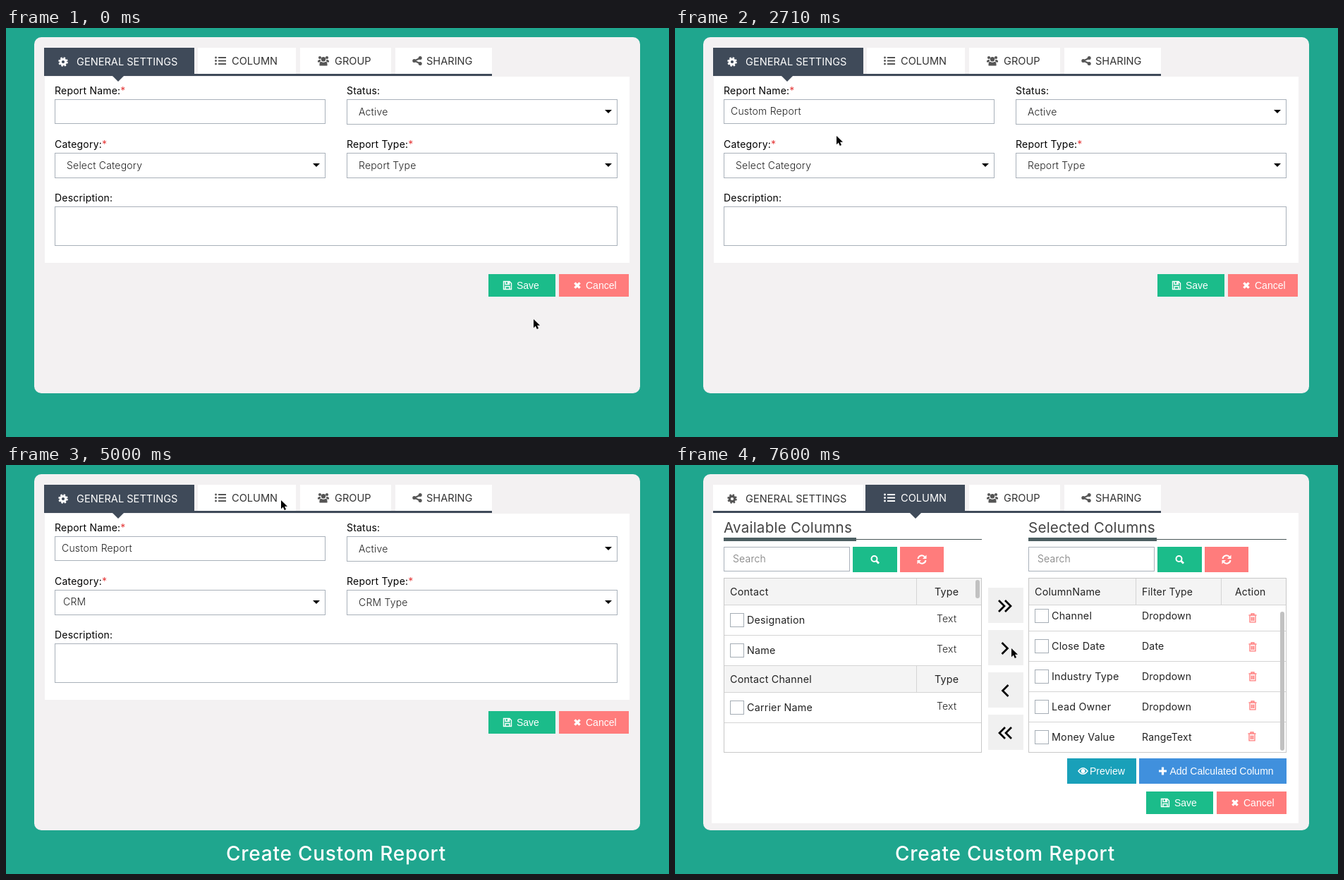
An HTML page that plays this animation: 940 by 580 pixels, repeating every 8000 ms.

```html
<!DOCTYPE html>
<html lang="en">
<head>
<meta charset="utf-8">
<title>Report builder</title>
<style>
  html, body { margin: 0; width: 100%; height: 100%; overflow: hidden; background: #1fa68e; }
  svg { display: block; font: 14px Inter, sans-serif; letter-spacing: .015em; fill: #222; }
  text { white-space: pre; }
  .tab { font-size: 14.6px; letter-spacing: 0; }
  .label { fill: #000; }
  .value { font-weight: 300; }
  .hint { fill: #777; }
  .list { font-size: 14.3px; }
  .head { font-size: 20.6px; fill: #444; }
  .button { font: 14px "Liberation Sans", Arial, sans-serif; letter-spacing: 0; fill: #fff; }
  .caption { font-size: 28px; font-weight: 500; letter-spacing: .027em; fill: #fff; }
  .line { fill: none; stroke: currentColor; stroke-width: 2; }
  .icon { fill: currentColor; }
</style>
</head>
<body>
<svg id="stage" width="940" height="580" viewBox="0 0 940 580"></svg>
<script>
const DARK = '#3f4a59', GREEN = '#1bbc8a', RED = '#ff7c7c', GREY = '#f4f4f4', EDGE = '#a9b1ba', RULE = '#d4d4d4';

const rect = (x, y, w, h, fill, extra = '') =>
  `<rect x="${x}" y="${y}" width="${w}" height="${h}" fill="${fill}" ${extra}/>`;
const frame = (x, y, w, h, color = EDGE, fill = '#fff') =>
  rect(x + .5, y + .5, w - 1, h - 1, fill, `stroke="${color}"`);
const text = (x, y, s, cls, extra = '') => `<text x="${x}" y="${y}" class="${cls}" ${extra}>${s}</text>`;
const group = (id, content, extra = '') => `<g id="${id}" ${extra}>${content}</g>`;
const line = d => `<path class="line" d="${d}"/>`;
const solid = d => `<path class="icon" d="${d}"/>`;
const dot = (x, y, r) => `<circle class="icon" cx="${x}" cy="${y}" r="${r}"/>`;

// Icons are centred on 0,0
const ICONS = {
  gear: `<circle class="line" r="3.7" style="stroke-width:3.2"/>
    <circle class="line" r="5.6" style="stroke-width:2.4" stroke-dasharray="2.4 2"/>`,
  list: [-4.5, 0, 4.5].map(y => dot(-6.5, y, 1.4) + line(`M-3 ${y}H8`)).join(''),
  users: dot(-5, -4.5, 2.1) + dot(5, -4.5, 2.1) + dot(0, -2.2, 3.2) +
    solid('M-8 2V0Q-7-2-4-1.5L-4.5 2ZM8 2V0Q7-2 4-1.5L4.5 2ZM-5.5 7Q-6 1.5-3 1.3Q0 3 3 1.3Q6 1.5 5.5 7Z'),
  share: line('M4.5-4L-4 0L4.5 4') + dot(4.2, -4, 2.5) + dot(-4.2, 0, 2.5) + dot(4.2, 4, 2.5),
  save: `<g style="stroke-width:1.4">` + '<path d="M-5.5-5.5H3L5.5-3V5.5H-5.5ZM-3-5.5V-1.5H2.5V-5.5M-3 5.5V1.5H3V5.5" fill="none" stroke="currentColor"/></g>' +
    solid('M0-5H2V-2H0Z'),
  cross: '<path d="M-3.6-3.6L3.6 3.6M3.6-3.6L-3.6 3.6" stroke="currentColor" stroke-width="3.4"/>',
  search: '<circle class="line" cx="-1" cy="-1" r="4"/>' + '<path d="M2 2L5.5 5.5" stroke="currentColor" stroke-width="2.8"/>',
  refresh: line('M-5.5-1A5.4 5.4 0 0 1 4.2-3.5M5.5 1A5.4 5.4 0 0 1-4.2 3.5') + solid('M6.5-6.5V-1H1ZM-6.5 6.5V1H-1Z'),
  trash: '<path d="M-5.5-4H5.5M-2-4.5V-6H2V-4.5M-4-3V5.8H4V-3M-1.7-1.5V4M0-1.5V4M1.7-1.5V4" fill="none" stroke="currentColor" stroke-width="1.3"/>',
  eye: '<path d="M-6.5 0Q0-8.5 6.5 0Q0 8.5-6.5 0Z" fill="none" stroke="currentColor" stroke-width="1.5"/>' + dot(0, 0, 2.9),
  plus: '<path d="M-5.5 0H5.5M0-5.5V5.5" stroke="currentColor" stroke-width="3.2"/>',
  down: solid('M-5-2.5H5L0 2.5Z'),
  right: '<path d="M-4-8L4 0L-4 8" fill="none" stroke="currentColor" stroke-width="2.7"/>',
};
const icon = (name, x, y, color = '#fff', scale = '') =>
  `<g transform="translate(${x} ${y}) ${scale}" color="${color}">${ICONS[name]}</g>`;

const button = (x, y, w, h, fill, name, iconX, label = '', textX = 0) =>
  rect(x, y, w, h, fill) + icon(name, iconX, y + h / 2) +
  (label && text(textX, y + h / 2 + 5, label, 'button'));
const saveCancel = (x, y) =>
  button(x, y, 95, 32, GREEN, 'save', x + 27, 'Save', x + 40) +
  button(x + 100, y, 99, 32, RED, 'cross', x + 126, 'Cancel', x + 138);

// Tabs: left, width, icon, icon x, text x, label
const TABS = [
  [54, 213, 'gear', 81, 100, 'GENERAL SETTINGS'],
  [272, 139, 'list', 304, 320, 'COLUMN'],
  [417, 129, 'users', 450, 466, 'GROUP'],
  [552, 137, 'share', 583, 596, 'SHARING'],
];
const tabs = active => rect(54, 65, 635, 3, DARK) + TABS.map(([x, w, name, iconX, textX, label], i) => {
  const on = i === active;
  const left = on && i ? x - 2 : x, mid = i ? 341 : 159;
  return rect(left, 28, x + w - left, on ? 40 : 37, on ? DARK : '#fff') +
    (on ? `<path d="M${mid - 8} 68h16l-8 8z" fill="${DARK}"/>` : '') +
    icon(name, iconX, i ? 46.5 : 48, on ? '#fff' : '#555') +
    text(textX, i ? 52 : 53, label, 'tab', `style="fill:${on ? '#fff' : '#333'}"`);
}).join('');

const label = (x, y, s, required) =>
  text(x, y, s + (required ? '<tspan fill="#e53e3e">*</tspan>' : ''), 'label');
const select = (x, y) => frame(x, y, 384, 36) + icon('down', x + 371, y + 17.5, '#000');

const general = rect(55, 69, 829, 264, '#fff') + tabs(0) +
  label(69, 94, 'Report Name:', true) + frame(69, 101, 384, 35) +
  label(483, 94, 'Status:') + select(483, 101) + text(500, 124, 'Active', 'value') +
  label(69, 170, 'Category:', true) + select(69, 177) +
  label(483, 170, 'Report Type:', true) + select(483, 177) +
  label(69, 246, 'Description:') + frame(69, 253, 798, 56) +
  text(79, 123, 'Custom Report', 'value', 'id="name"') +
  text(0, 0, '', 'value', 'id="category"') + text(500, 200, '', 'value', 'id="type"') +
  saveCancel(684, 349);

const checkbox = (x, y) => frame(x, y, 20, 20, '#a5adb5');
const rule = (x, y) => rect(x, y, 366, 1, RULE);
const listHead = (x, title, width) =>
  text(x, 96, title, 'head') + rect(x, 105, 366, 1, '#4a5658') + rect(x, 103, width, 5, '#4d5f62') +
  frame(x, 116, 179, 35) + text(x + 13, 138, 'Search', 'value hint') +
  button(x + 183, 116, 63, 36, GREEN, 'search', x + 214.5) +
  button(x + 250, 116, 62, 36, RED, 'refresh', x + 281);
const section = (y, title) =>
  rect(69, y, 366, 38, GREY) + rect(342, y, 1, 38, RULE) + rule(69, y) + rule(69, y + 38) +
  text(78, y + 25, title, 'list') + text(368, y + 25, 'Type', 'list');
const leftRow = (y, name, type, typeX = 371) =>
  checkbox(78, y - 10) + text(102, y + 5, name, 'list') + text(typeX, y + 3, type, typeX < 371 ? '' : 'value');
const rightRow = (y, name, type, trashY, trashX = 819) =>
  checkbox(510, y - 10) + text(534, y + 5, name, 'list') + text(662, y + 5, type, '') + icon('trash', trashX, trashY, RED);

const mover = (y, flip, xs) => rect(444, y, 50, 50, '#f0f0f0') +
  xs.map(x => icon('right', x, y + 26, '#000', `scale(${flip} 1)`)).join('');

const columns = rect(52, 68, 832, 440, '#fff') + tabs(1) +
  listHead(69, 'Available Columns', 188) + listHead(501, 'Selected Columns', 182) +
  section(160, 'Contact') + leftRow(220, 'Designation', 'Text') + rule(69, 241) + leftRow(263, 'Name', 'Text') +
  section(284, 'Contact Channel') + leftRow(344, 'Carrier Name', 'Text') + rule(69, 365) +
  group('available', leftRow(387, 'Money Value', 'RangeText', 328) +
    group('checked', frame(78, 377, 20, 20, '#2196f3') +
      '<path d="M83 387.5l4 4 7-8" fill="none" stroke="#2196f3" stroke-width="2.6"/>')) +
  frame(69, 160, 366, 248, '#c8c8c8', 'none') + rect(426, 163, 6, 26, '#c1c1c1', 'rx="3"') +
  rect(501, 160, 366, 38, GREY) + rect(653, 160, 1, 38, RULE) + rect(774, 160, 1, 38, RULE) +
  text(510, 185, 'ColumnName', 'list') + text(662, 185, 'Filter Type', '') + text(794, 185, 'Action', '') +
  [198, 235, 278, 321, 364].map(y => rule(501, y)).join('') +
  rightRow(214, 'Channel', 'Dropdown', 217) + rightRow(257, 'Close Date', 'Date', 258) +
  rightRow(300, 'Industry Type', 'Dropdown', 300) + rightRow(343, 'Lead Owner', 'Dropdown', 341) +
  group('selected', rightRow(386, 'Money Value', 'RangeText', 385, 818)) +
  frame(501, 160, 366, 248, '#c8c8c8', 'none') + rect(858, 208, 6, 197, '#c1c1c1', 'rx="3"') +
  mover(174, 1, [463, 472]) + mover(234, 1, [467.5]) + mover(294, -1, [468.5]) + mover(354, -1, [464, 473]) +
  group('pressed', rect(443, 235, 50, 50, '#dedede') + icon('right', 467.5, 260, '#000')) +
  button(556, 416, 98, 36, '#19a0b9', 'eye', 578.5, 'Preview', 588) +
  button(658, 416, 209, 36, '#4090dd', 'plus', 691.5, 'Add Calculated Column', 701.5) +
  saveCancel(668, 463);

const stage = document.getElementById('stage');
stage.innerHTML = '<clipPath id="below"><path d="M0 526H940V580H0Z"/></clipPath>' +
  rect(0, 0, 940, 580, '#1fa68e') + rect(40, 13, 859, 505, '#f3f1f2', 'rx="10"') +
  group('general', general) + group('columns', columns) +
  `<g clip-path="url(#below)">${text(312, 561, 'Create Custom Report', 'caption', 'id="caption"')}</g>` +
  '<path id="cursor" d="M0 0V12.3L2.8 9.6L4.8 14L7 13L5 8.8H9Z" fill="#000"/>';

const el = id => document.getElementById(id);
const show = (id, on) => { el(id).style.display = on ? '' : 'none'; };

// Share of a stepped linear move that is done at time t
const progress = (t, start, interval, steps) =>
  Math.max(0, Math.min(steps, Math.floor((t - start) / interval) + 1)) / steps;

// Cursor moves: start, step interval, steps, target x, target y
const MOVES = [
  [1030, 30, 9, 120, 117],
  [2310, 100, 10, 338, 189],
  [3950, 30, 7, 630, 196],
  [4790, 30, 8, 390, 50],
  [6160, 30, 9, 86, 387],
  [6960, 30, 8, 477, 260],
];

function render(t) {
  let x = 748, y = 413;
  for (const [start, interval, steps, toX, toY] of MOVES) {
    const p = progress(t, start, interval, steps);
    x += (toX - x) * p;
    y += (toY - y) * p;
  }
  el('cursor').setAttribute('transform', `translate(${x} ${y})`);
  el('caption').setAttribute('y', 561 - 170.5 * (1 - progress(t, 2310, 100, 11)));

  const picked = t >= 3820, category = el('category');
  category.textContent = picked ? 'CRM' : 'Select Category';
  category.setAttribute('x', picked ? 81 : 86);
  category.setAttribute('y', picked ? 199 : 200);
  el('type').textContent = t >= 4660 ? 'CRM Type' : 'Report Type';

  show('name', t >= 1800);
  show('general', t < 5530);
  show('columns', t >= 5530);
  show('checked', t >= 6630);
  show('pressed', t >= 7400 && t < 7600);
  show('available', t < 7600);
  show('selected', t >= 7600);
}

function tick() {
  render(performance.now() % 8000);
  requestAnimationFrame(tick);
}
tick();
</script>
</body>
</html>
```
